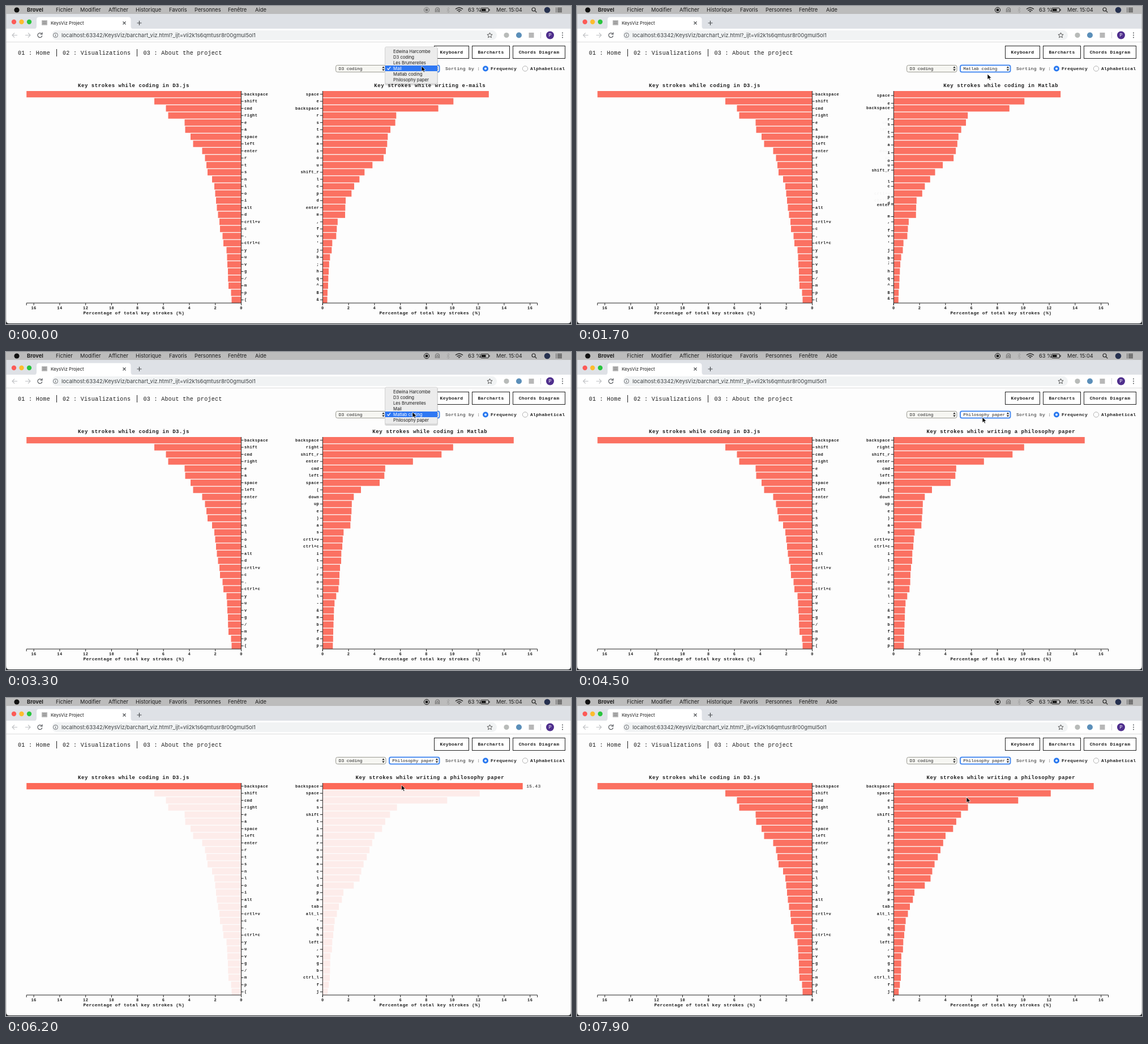
Write an HTML page that moves like this. It is 998 px wide and 561 px high and loops after 8 s.

```html
<!DOCTYPE html>
<html lang="fr">
<head>
<meta charset="utf-8">
<title>KeysViz Project</title>
<style>
html, body { margin: 0; width: 100%; height: 100%; overflow: hidden; background: #fdfdfd; }
svg { display: block; width: 998px; height: 561px; }
text { fill: #1c1c1c; white-space: pre; }
.ui { font: 9.3px Inter, "Liberation Sans", sans-serif; }
.strong { font-weight: 700; }
.tab { font: 8px Inter, "Liberation Sans", sans-serif; }
.url { font: 9.5px Inter, "Liberation Sans", sans-serif; fill: #3c4043; }
.item { font: 7.65px Inter, "Liberation Sans", sans-serif; }
.nav, .ctl, .sel, .title, .axis, .key, .tick, .value { font-family: "Courier New", "Liberation Mono", monospace; }
.nav { font-size: 10px; letter-spacing: .33px; }
.ctl { font-size: 8px; letter-spacing: .32px; font-weight: 700; }
.thin { font-weight: 400; }
.sel { font-size: 7.7px; }
.title { font-size: 9px; letter-spacing: .57px; font-weight: 700; }
.axis { font-size: 8px; letter-spacing: .31px; font-weight: 700; }
.key { font-size: 7px; letter-spacing: .5px; font-weight: 700; }
.tick { font-size: 7px; letter-spacing: .4px; font-weight: 700; }
.value { font-size: 8px; letter-spacing: .25px; }
</style>
</head>
<body>
<svg id="stage" viewBox="0 0 998 561"></svg>
<script>
const LOOP = 8000, STEP = 100, MORPH = 1000;
const UNIT = 22.9, ROW = 12.51, TOP = 150, BASE = 524, L0 = 415.5, R0 = 559.3, SPAN = 379.3;
const RED = '#fb7162', INK = '#222';
const stage = document.getElementById('stage');

function add(tag, attrs, parent = stage) {
  const el = document.createElementNS('http://www.w3.org/2000/svg', tag);
  for (const k in attrs) el.setAttribute(k, attrs[k]);
  parent.appendChild(el);
  return el;
}
const rect = (x, y, width, height, fill, more, parent) =>
  add('rect', { x, y, width, height, fill, ...more }, parent);
const dot = (cx, cy, r, fill, more, parent) => add('circle', { cx, cy, r, fill, ...more }, parent);
const path = (d, stroke, more, parent) => add('path', { d, stroke, fill: 'none', ...more }, parent);
function text(x, y, str, cls, anchor = 'start', parent) {
  const el = add('text', { x, y, class: cls, 'text-anchor': anchor }, parent);
  el.textContent = str;
  return el;
}
const show = (el, on) => el.setAttribute('visibility', on ? 'visible' : 'hidden');
const clamp = v => Math.max(0, Math.min(1, v));
const cubic = u => u < .5 ? 4 * u ** 3 : 1 - 4 * (1 - u) ** 3;

// Data: keys with bar lengths in pixels
const left = {
  keys: 'backspace shift cmd right e a space left enter r t s n l o i alt d crtl+v c . ctrl+c y u v g / m p ('.split(' '),
  w: [379.3, 153.5, 133, 129, 100, 99, 89.5, 85, 69, 64, 61.5, 59.5, 51.5, 47.5, 46, 44.5, 43, 41, 38.5, 37.5,
    33, 31.5, 26, 25, 24.5, 23.5, 23.3, 22.5, 18, 17]
};
const sets = [{
  name: 'Mail', title: 'Key strokes while writing e-mails',
  keys: "space e backspace r s t n a i o u shift_r l c p d enter m , f v ' j b ; h q ^ B &".split(' '),
  w: [293.5, 231, 204.3, 130, 128.3, 119.7, 115, 114, 111.7, 107.7, 88, 74, 65, 55.7, 51, 40.7, 40, 39.7, 26.5, 25,
    24, 17, 16, 13, 11.5, 10.7, 10, 9.6, 8.6, 8.2]
}, {
  name: 'Matlab coding', title: 'Key strokes while coding in Matlab',
  keys: 'backspace right shift_r enter cmd left space ( down up e ) a s crtl+v ctrl+c i t ; r o = l - & m b f d p'.split(' '),
  w: [337.5, 230.5, 210, 159.5, 110.5, 109, 100.7, 67.7, 55, 51.5, 51, 50, 49, 37, 35.5, 34.7, 33, 32.7, 30.7, 29.7,
    29.3, 28, 24, 21, 20, 19.7, 19.2, 18.7, 18.5, 18]
}, {
  name: 'Philosophy paper', title: 'Key strokes while writing a philosophy paper',
  keys: "backspace space e s shift t i n r u o a c l d p m tab alt_l ' q h left , v g b ctrl_l f j".split(' '),
  w: [353.4, 277.5, 220, 131.3, 119, 110.6, 105, 91.7, 87.5, 82.7, 78, 72.3, 68.2, 65.2, 55, 36.7, 34, 28.7, 25.2, 21.3,
    20, 18.7, 17, 16.5, 13.6, 13.3, 13, 12.7, 11, 9]
}];
const options = ['Edwina Harcombe', 'D3 coding', 'Les Brumerelles', 'Mail', 'Matlab coding', 'Philosophy paper'];

// Timeline
const changes = [1500, 4500];
const menus = [{ from: 0, to: 1400, pick: 3 }, { from: 3000, to: 4400, pick: 4 }];
const hovers = [{ from: 5900, to: 6950, row: 0 }, { from: 7050, to: 7600, row: 1 }];
const pointer = [
  [0, 734, 106], [500, 734, 106], [1000, 726, 119], [1400, 725, 120], [2200, 725, 120],
  [3000, 718, 106], [3600, 718, 106], [4000, 716, 115], [5500, 716, 115], [5900, 700, 151],
  [6200, 698.5, 153.5], [6900, 697, 157], [7200, 692, 166], [7900, 688, 175], [8000, 688, 175]
];

// System menu bar
rect(0, 0, 998, 561, '#fdfdfd');
rect(0, 0, 998, 14, '#bcbcbc');
dot(19, 7, 4.6, '#111');
text(37, 10.4, 'Brovel', 'ui strong');
[[88, 'Fichier'], [131, 'Modifier'], [181, 'Afficher'], [229, 'Historique'], [288, 'Favoris'],
 [333, 'Personnes'], [392, 'Fenêtre'], [440, 'Aide'], [816, '63 %'], [866, 'Mer. 15:04']]
  .forEach(([x, s]) => text(x, 10.4, s, 'ui'));
const recorder = add('g', {});
dot(743, 7, 4.6, 'none', { stroke: '#111', 'stroke-width': 1 }, recorder);
rect(740.8, 4.8, 4.4, 4.4, '#111', { rx: 1 }, recorder);
path('M758.5 11V6.5a3.5 3.5 0 0 1 7 0V11M760.8 11V7a1.3 1.3 0 0 1 2.6 0V11', '#666', { 'stroke-width': 1.1 });
path('M778.5 4.5l5 5-2.5 2.5V2l2.5 2.5-5 5', '#a2a2a2', { 'stroke-width': .9 });
path('M794 5.5q6.5-5 13 0M796.5 8q4-3 8 0M799 10q1.5-1 3 0', '#222', { 'stroke-width': 1.5 });
rect(838.5, 3.5, 14, 7, 'none', { stroke: '#222', rx: 1.5 });
rect(840, 5, 7.5, 4, '#111');
rect(853.3, 5.5, 1.3, 3, '#222');
dot(932, 6, 3, 'none', { stroke: '#222', 'stroke-width': 1.1 });
path('M934.3 8.3l3 3', '#222', { 'stroke-width': 1.2 });
dot(956, 7, 5.3, '#26314f');
path('M971 3.8h1.5m1.5 0h8M971 7h1.5m1.5 0h8M971 10.2h1.5m1.5 0h8', '#222', { 'stroke-width': 1.3 });

// Browser window
rect(0, 14, 998, 27, '#dee1e6');
path('M49 40.5q5 0 5-5V24q0-4.5 4.5-4.5H216q4.5 0 4.5 4.5v11.5q0 5 5 5z', 'none', { fill: '#fff' });
rect(0, 40, 998, 23, '#fff');
['#fc5b57', '#fdbc2e', '#2ac53f'].forEach((c, i) => dot(14 + 13.5 * i, 28, 4.2, c));
rect(63, 25, 10, 9, '#b9b9b9', { rx: 1 });
path('M64.5 28h7M64.5 31h7', '#777', { 'stroke-width': 1.2 });
text(79, 32.7, 'KeysViz Project', 'tab');
path('M206.5 27.5l5 5m0-5l-5 5M231.5 30h8m-4-4v8', '#4a4d50', { 'stroke-width': 1.2 });
path('M20 51.5h-9m4-4l-4 4 4 4M34 51.5h9m-4-4l4 4-4 4', '#bfc1c4', { 'stroke-width': 1.1 });
path('M63 49a4 4 0 1 0 .8 3.5M64 46.5v3.5h-3.5', '#55585c', { 'stroke-width': 1.2 });
rect(81, 43, 786, 17, '#f1f3f4', { rx: 8.5 });
dot(87.5, 51.5, 4, 'none', { stroke: '#5f6368', 'stroke-width': .9 });
path('M87.5 51v2.7M87.5 49.2v1', '#5f6368');
text(98, 54.8, 'localhost:63342/KeysViz/barchart_viz.html?_ijt=vli2k1s6qmtusr8r00gmul5ol1', 'url');
path('M854.5 47l1.3 3 3.3.3-2.5 2.2.8 3.2-2.9-1.7-2.9 1.7.8-3.2-2.5-2.2 3.3-.3z', '#444', { 'stroke-width': .9 });
dot(884, 51.5, 4.6, '#b8bbb9');
dot(906, 51.5, 5, '#5b8fb9');
rect(923.5, 47, 9, 9, '#b7b7b7');
path('M944.5 46v11', '#d5d7da');
dot(961, 51.5, 7, '#4f2f8d');
text(961, 54.2, 'P', 'tab', 'middle').style.fill = '#fff';
[47.5, 51.5, 55.5].forEach(y => dot(983, y, 1, '#55585c'));
path('M0 63.5h998', '#dcdcdc');

// Page header
text(21, 86.3, '01 : Home', 'nav');
text(100, 86.3, '02 : Visualizations', 'nav');
text(242.5, 86.3, '03 : About the project', 'nav');
path('M89.5 76v13M231.5 76v13', INK);
[[756.5, 61, 'Keyboard'], [823.5, 66, 'Barcharts'], [895.5, 92, 'Chords Diagram']].forEach(([x, w, s]) => {
  rect(x, 70.5, w, 22, '#fff', { stroke: INK });
  text(x + w / 2, 84.3, s, 'ctl', 'middle');
});

function select(x, value, focused) {
  rect(x, 104.5, 88.5, 12, focused ? '#fff' : '#f6f6f2',
    { rx: 3, stroke: focused ? '#4a8cf0' : '#9b9b93', 'stroke-width': focused ? 2 : 1 });
  path(`M${x + 81.8} 109.6h4.4l-2.2-3zm0 2h4.4l-2.2 3z`, 'none', { fill: INK });
  return text(x + 5.3, 113.2, value, 'sel');
}
select(582.5, 'D3 coding', false);
const chosen = select(677, '', true);
text(776, 113.3, 'Sorting by :', 'ctl thin');
dot(847, 110.5, 5, '#2878f0');
dot(847, 110.5, 1.9, '#fff');
text(856, 113.3, 'Frequency', 'ctl');
dot(917, 110.5, 4.6, '#fff', { stroke: '#aaa', 'stroke-width': .9 });
text(926, 113.3, 'Alphabetical', 'ctl');

// Charts
text(225.5, 142.8, 'Key strokes while coding in D3.js', 'title', 'middle');
const heading = text(748.8, 142.8, '', 'title', 'middle');
const rowY = i => TOP + 5.6 + i * ROW;
const bar = (x, i, w) => rect(x, TOP + i * ROW, w, 11.2, RED);
const leftBars = left.w.map((w, i) => bar(L0 - w, i, w));
const rightBars = sets[0].w.map((w, i) => bar(R0, i, w));

function axes(x0, dir) {
  const end = x0 + dir * SPAN, mid = x0 + dir * SPAN / 2;
  path(`M${x0} ${TOP}V${BASE}M${x0} ${BASE + 4}V${BASE}H${end}v4`, INK);
  for (let v = 0; v <= 16; v += 2) {
    const x = x0 + dir * v * UNIT;
    path(`M${x} ${BASE}v4`, INK);
    text(x, 534.6, v, 'tick', 'middle');
  }
  text(mid, 543.6, 'Percentage of total key strokes (%)', 'axis', 'middle');
}
axes(L0, -1);
axes(R0, 1);
left.keys.forEach((k, i) => {
  path(`M${L0} ${rowY(i)}h4`, INK);
  text(421, rowY(i) + 2, k, 'key');
});
const labels = [...new Set(sets.flatMap(s => s.keys))].map(key => {
  const g = add('g', {});
  path(`M${R0} 0h-4.5`, INK, {}, g);
  text(553.3, 2, key, 'key', 'end', g);
  return { key, g };
});
const value = text(0, 0, '', 'value');

// Open list
const list = add('g', {});
rect(669, 73, 94, 67, '#000', { rx: 3, opacity: .14 }, list);
rect(669.5, 72, 92.5, 65, '#ececec', { rx: 2.5, stroke: '#c4c4c4', 'stroke-width': .6 }, list);
const glow = rect(669.5, 0, 92.5, 10, '#2f78f3', {}, list);
const rows = options.map((s, i) => text(684, 82.6 + 10 * i, s, 'item', 'start', list));
const check = path('M673.5 0l2 2.3 3.6-5', INK, { 'stroke-width': 1.2 }, list);

// Window edge and pointer
path('M.5 14V556q0 4.5 4.5 4.5H993q4.5 0 4.5-4.5V14', '#b5b5b5', { 'stroke-width': .6 });
path('M0 554q0 6 6 6H992q6 0 6-6v7H0z', 'none', { fill: '#2a2d30' });
const cursor = path('M0 0V9.6L2.3 7.5 3.9 11 5.5 10.3 4 7H7.2z', '#fff', { fill: '#000', 'stroke-width': .7 });

function pointerAt(t) {
  const n = pointer.findIndex((p, i) => i && t <= p[0]);
  const [ta, xa, ya] = pointer[n - 1], [tb, xb, yb] = pointer[n];
  const u = (t - ta) / (tb - ta), e = u * u * (3 - 2 * u);
  return [xa + (xb - xa) * e, ya + (yb - ya) * e];
}

function drawMenu(t, y) {
  const menu = menus.find(m => t >= m.from && t < m.to);
  show(list, menu);
  if (!menu) return;
  const shift = 30 - 10 * menu.pick;
  const over = Math.max(0, Math.min(5, Math.floor((y - 75 - shift) / 10)));
  list.setAttribute('transform', `translate(0 ${shift})`);
  glow.setAttribute('y', 75 + 10 * over);
  rows.forEach((r, i) => r.style.fill = i === over ? '#fff' : '#1c1c1c');
  check.setAttribute('transform', `translate(0 ${80 + 10 * menu.pick})`);
  check.setAttribute('stroke', menu.pick === over ? '#fff' : INK);
}

function drawChart(t) {
  const n = changes.filter(c => t >= c).length;
  const to = sets[n], from = sets[Math.max(0, n - 1)];
  const p = n ? cubic(clamp((t - changes[n - 1]) / MORPH)) : 1;
  heading.textContent = to.title;
  chosen.textContent = sets[menus.filter(m => t >= m.to).length].name;
  rightBars.forEach((b, i) => b.setAttribute('width', from.w[i] + (to.w[i] - from.w[i]) * p));
  labels.forEach(({ key, g }) => {
    const a = from.keys.indexOf(key), b = to.keys.indexOf(key);
    const i = a < 0 ? b : b < 0 ? a : a + (b - a) * p;
    g.setAttribute('opacity', i < 0 ? 0 : a < 0 ? p : b < 0 ? 1 - p : 1);
    g.setAttribute('transform', `translate(0 ${rowY(i)})`);
  });
}

function drawHover(t) {
  const { keys, w } = sets[2];
  const hover = hovers.find(h => t >= h.from && t < h.to + 100);
  const level = hover ? Math.min(clamp((t - hover.from) / 200), clamp((hover.to + 100 - t) / 100)) : 0;
  const key = hover && keys[hover.row];
  const paint = (bars, names) => bars.forEach((b, i) => {
    const lit = names[i] === key;
    b.setAttribute('fill', lit && level ? '#fd6a59' : RED);
    b.setAttribute('opacity', lit ? 1 : 1 - .88 * level);
  });
  paint(leftBars, left.keys);
  paint(rightBars, keys);
  show(value, hover && t < hover.to);
  if (!hover) return;
  value.textContent = (w[hover.row] / UNIT).toFixed(2);
  value.setAttribute('x', R0 + w[hover.row] + 6.5);
  value.setAttribute('y', rowY(hover.row) + 2.7);
}

function draw(now) {
  const t = Math.floor(now % LOOP / STEP) * STEP;
  const [x, y] = pointerAt(t);
  cursor.setAttribute('transform', `translate(${x} ${y})`);
  recorder.setAttribute('opacity', t < 500 ? .4 : 1);
  drawMenu(t, y);
  drawChart(t);
  drawHover(t);
}

const start = performance.now();
function tick() {
  draw(performance.now() - start);
  requestAnimationFrame(tick);
}
tick();
</script>
</body>
</html>
```
